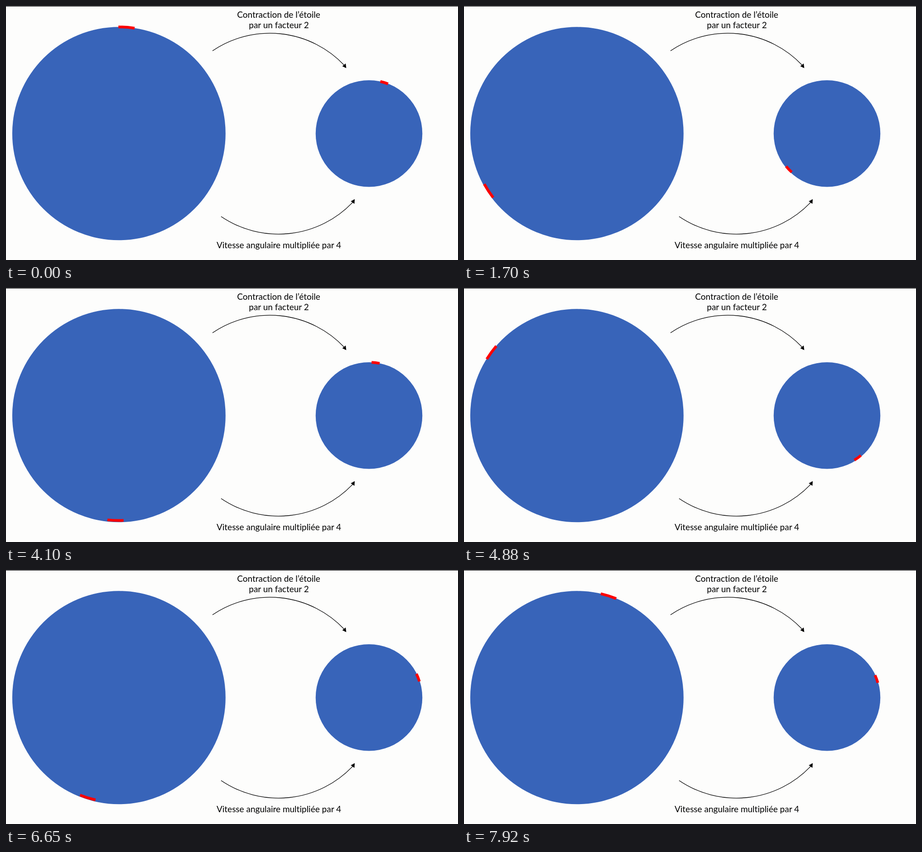
Animation of 998 by 561 pixels, one loop 7.99 s. Source, as an HTML page:

```html
<!DOCTYPE html>
<html lang="fr">
<head>
<meta charset="utf-8">
<title>Contraction d’une étoile</title>
<style>
  html, body { margin: 0; width: 100%; height: 100%; overflow: hidden; background: #fdfdfc; }
  svg { display: block; width: 100%; height: 100%; }
  text { font: 19px Lato, "Open Sans", sans-serif; font-variant-ligatures: none; text-anchor: middle; }
  .star { fill: #3864b9; }
  .mark { fill: none; stroke: #f00; stroke-width: 6; stroke-dasharray: 8.8 360; }
  .arrow { fill: none; stroke: #000; stroke-width: 1.3; }
</style>
</head>
<body>
<svg viewBox="0 0 998 561">
  <rect width="998" height="1"/>

  <circle class="star" cx="249.3" cy="281.8" r="235.5"/>
  <circle class="star" cx="801.5" cy="281.7" r="117.8"/>

  <path class="arrow" d="M456 99A226 226 0 0 1 747 131"/>
  <path d="M751.3 137.3L742.5 133L750 127Z"/>
  <path class="arrow" d="M475 465A226 226 0 0 0 765.5 433.5"/>
  <path d="M770 426.5L761.3 431.3L769.3 437Z"/>

  <text x="602" y="26.2">Contraction de l’étoile</text>
  <text x="602.5" y="49">par un facteur 2</text>
  <text x="602.5" y="535">Vitesse angulaire multipliée par 4</text>

  <g transform="translate(249 279.9)">
    <circle id="large" class="mark" r="233.6" pathLength="360"/>
  </g>
  <g transform="translate(801.5 280.5)">
    <circle id="small" class="mark" r="116.5" pathLength="360"/>
  </g>
</svg>
<script>
const LOOP = 7990;
const REFRESH = 50;
const MARK_SPAN = 8.8;

// Key points of the slightly uneven spin: [ms, large star's degrees clockwise from the top]
const keys = [
  [0, 4.2], [1700, 236.6], [2980, 383], [4100, 541.8],
  [4880, 666.1], [6650, 917.1], [7920, 1097.5]
];

// Linear between key points, held for about one refresh at a time
function largeAngle(t) {
  const next = keys.findIndex(([time]) => time > t);
  if (next < 0) return keys.at(-1)[1];
  const [t0, a0] = keys[next - 1];
  const [t1, a1] = keys[next];
  const steps = Math.round((t1 - t0) / REFRESH);
  const progress = Math.floor((t - t0) / (t1 - t0) * steps) / steps;
  return a0 + (a1 - a0) * progress;
}

function placeMark(id, angle) {
  document.getElementById(id).setAttribute("transform", `rotate(${angle - 90 - MARK_SPAN / 2})`);
}

function draw() {
  const angle = largeAngle(performance.now() % LOOP);
  placeMark("large", angle);
  placeMark("small", angle * 4); // half the radius, four times the speed
  requestAnimationFrame(draw);
}
draw();
</script>
</body>
</html>
```
